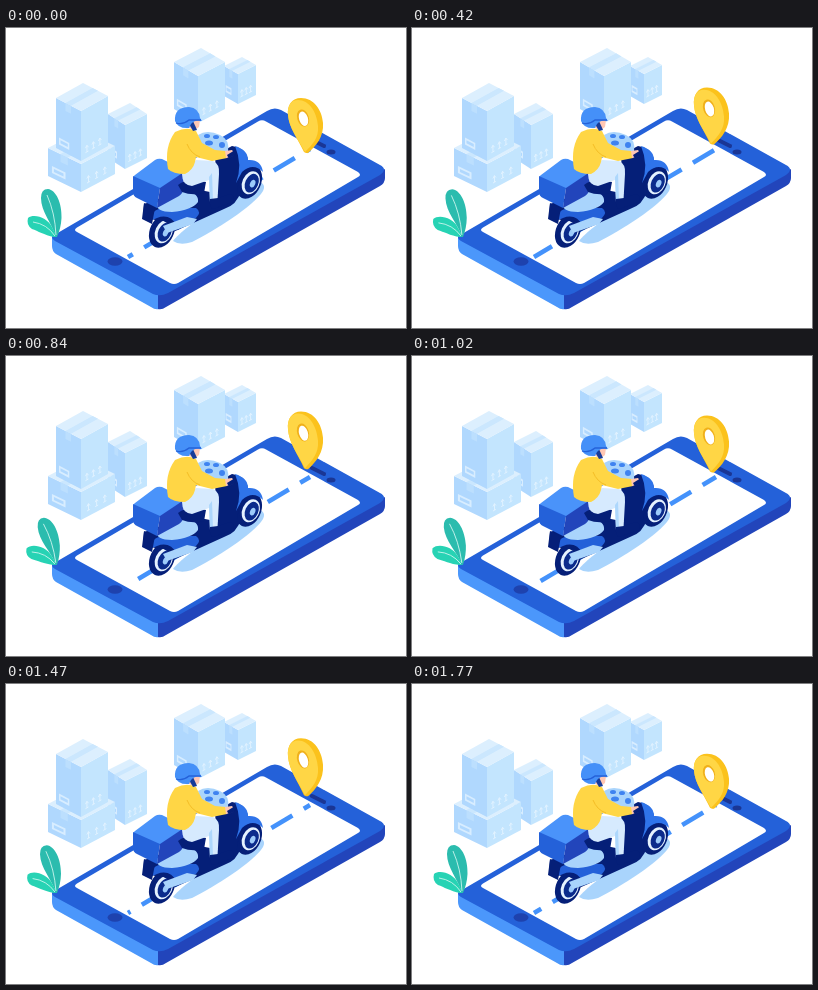
These frames come from a looping animation (400x300 px, 1800 ms). An HTML page:

```html
<!DOCTYPE html>
<html lang="en">
<head>
<meta charset="utf-8">
<title>Scooter delivery</title>
<style>
  html, body { margin: 0; width: 100%; height: 100%; overflow: hidden; background: #fff; }
  svg { display: block; width: 400px; height: 300px; }
</style>
</head>
<body>
<svg viewBox="0 0 400 300">
  <g id="boxes"></g>

  <!-- phone -->
  <path fill="#4b97fb" d="M46 208L153 266V281Q149 282 145 279L50 226Q46 223 46 218Z"/>
  <path fill="#2245bb" d="M152 266L379 141V150Q379 155 374 158L160 279Q156 282 152 281Z"/>
  <path fill="#2461d9" d="M49 206.500L261 83Q268 78.500 275 82L374 137Q382 141 374 147L162 265Q154 269 147 266L49 213Q43 209 49 206.500Z"/>
  <path fill="#fff" d="M71 199.500L252 93.500Q256 91 260 93.500L352 144Q356 147 352 149L172 255Q168 257 164 255L71 204Q67 202 71 199.500Z"/>
  <ellipse cx="109" cy="233.500" rx="7.500" ry="4.200" fill="#1e42ae"/>
  <path d="M306 112L318 118" stroke="#1a3695" stroke-width="4" stroke-linecap="round"/>
  <ellipse cx="325" cy="124" rx="4.500" ry="2.500" fill="#1a3695"/>
  <path id="road" d="M122 229L304 121" pathLength="182" stroke="#4492fb" stroke-width="4.600" stroke-dasharray="21 11.400"/>

  <!-- plant -->
  <g id="plant">
    <path fill="#2bbcae" d="M50 209C46 195 35 184 35 170Q35 161 42 161C50 162 56 175 55.500 190Q55 200 51 209Z"/>
    <path fill="#27d3b4" d="M48 209C38 207 32 203 26 201Q20 197 22 190C28 185 42 190 46 199Q49 204 50 209Z"/>
    <path fill="none" stroke="#c9f4ed" stroke-width=".9" d="M41 167Q49 185 50 207M27 194Q41 196 49 208"/>
  </g>

  <!-- scooter -->
  <path fill="#a9d4fc" d="M167 213C178 198 236 161 250 153Q261 155 257 163C248 178 208 203 186 214Q174 218 167 213Z"/>
  <g id="wheels"></g>
  <path fill="#051f78" d="M138 176L184 160L214 166L231 154L235 163Q231 177 218 181L185 196L167 204Q161 190 149 192L137 188Z"/>
  <path fill="#2461d9" d="M144 193Q145 181 158 180L190 180Q196 184 190 190L171 198Q164 185 151 190Z"/>
  <path fill="#a9d4fc" d="M150 175Q168 162 181 164Q193 165 192 174Q186 182 166 184Q150 184 150 175Z"/>
  <path fill="#a9d4fc" d="M157 198L181 189L191 191L187 196L161 205Z"/>
  <path fill="#051f78" d="M138 175L149 180L146 196L136 191Z"/>
  <path fill="#4a93fa" d="M129 147L149 132Q152 130 156 131L176 141Q180 144 176 147L157 160Q154 162 150 160L130 151Q126 149 129 147Z"/>
  <path fill="#2461d9" d="M127 148L154 160L151 180L131 170Q127 168 127 164Z"/>
  <path fill="#2245bb" d="M154 160L178 144L177 162Q177 165 173 168L151 180Z"/>
  <path fill="#051f78" d="M172 157Q180 150 200 154L198 165Q186 168 176 164Z"/>

  <!-- front shield -->
  <path fill="#051f78" d="M209 127L226 118Q240 120 242 132L235 149Q231 157 231 165L222 174L211 165Z"/>
  <path fill="#2f74ea" d="M229 118Q242 122 242 132Q255 131 257 144Q247 134 236 144L230 155Q237 137 229 118Z"/>
  <path fill="#a9d4fc" d="M192 107Q201 101 214 107Q224 112 222 123L208 125L195 117Z"/>
  <g fill="#3f83f0">
    <ellipse cx="201" cy="108" rx="3" ry="2"/>
    <ellipse cx="210" cy="109" rx="3" ry="2"/>
    <ellipse cx="203" cy="115" rx="4" ry="2.500"/>
    <ellipse cx="216" cy="117" rx="3" ry="3"/>
  </g>

  <!-- rider -->
  <path fill="#d6eafe" d="M176 146L190 132L207 133Q214 136 213 146L211.500 172L204 174L203 152L186 158Q176 157 176 146Z"/>
  <path fill="#add7fc" d="M203 149L206 145L207 173L204 174Z"/>
  <path fill="#051f78" d="M204 171L212 170L224 166Q230 168 227 174L207 181Q203 179 204 171Z"/>
  <path fill="#ffd645" d="M169 104Q181 98 190 103L196 115L209 122L220 123L221 130L206 133L190 129L189 134Q187 142 179 146Q167 146 162 141Q158 119 169 104Z"/>
  <path fill="none" stroke="#f4bd25" d="M181 116Q185 126 194 129"/>
  <path fill="#ffc7b4" d="M219 123L226 122Q230 126 225 129L220 130Z"/>
  <path fill="#051f78" d="M221 127L229 122L231 125L223 131Z"/>
  <path fill="#ffc7b4" d="M183 92L194 92L193 99Q189 103 183 100Z"/>
  <path fill="#173b99" d="M183 96L187 93L191 102L187 103Z"/>
  <path fill="#4590f8" d="M169 93Q168 79 183 79Q193 80 194 90L196 93Q189 91 185 96L183 100Q172 101 169 93Z"/>
  <path fill="none" stroke="#2461d9" stroke-width="1.300" d="M170 95Q177 97 183 92L195 92"/>

  <!-- map pin, tip at the local zero point -->
  <g id="pin">
    <path fill="#fbc21c" d="M0 0H2C10-7 18-16 17-30C16-43 8-55-5-55C-14-55-19-48-18-38C-17-25-8-14-2-1Z"/>
    <path fill="#ffd645" d="M-1-1C6-8 13-15 12-27C11-41 3-53-8-53C-15-53-19-47-18-38C-17-25-8-14-1-1Z"/>
    <ellipse cx="-3" cy="-35" rx="5.800" ry="8.800" fill="#f0b01a" transform="rotate(-18 -3 -35)"/>
    <ellipse cx="-2.500" cy="-34.300" rx="4.400" ry="7.400" fill="#fff" transform="rotate(-18 -2.500 -34.300)"/>
  </g>
</svg>
<script>
const $ = id => document.getElementById(id);
const poly = (fill, ...pts) => `<path fill="${fill}" d="M${pts.join('L')}Z"/>`;

// Carton seen from its front top corner: left and right edge vectors, then height.
function carton(x, y, lx, ly, rx, ry, h) {
  const at = (l, r, d = 0) => [x - lx * l + rx * r, y - ly * l - ry * r + d];
  const face = (fill, ...pts) => poly(fill, ...pts.map(p => at(...p)));
  const arrow = r => {
    const [ax, ay] = at(0, r, h - 6);
    return `<path d="M${ax} ${ay}v-6m-1.500 2.500l1.500-3l1.500 2m-3 5.500l3-1.700" fill="none" stroke="#e4f3ff" stroke-width=".9"/>`;
  };
  return face('#b0d8fe', [0, 0], [1, 0], [1, 0, h], [0, 0, h])
    + face('#c3e5fe', [0, 0], [0, 1], [0, 1, h], [0, 0, h])
    + face('#dceffe', [0, 0], [1, 0], [1, 1], [0, 1])
    + face('#cbe7fe', [.4, 0], [.62, 0], [.62, 1], [.4, 1])
    + face('#bcdffe', [.4, 0], [.62, 0], [.62, 0, 8], [.4, 0, 8])
    + face('#d8edff', [.47, 0, h - 12], [.88, 0, h - 12], [.88, 0, h - 5], [.47, 0, h - 5])
    + face('#b0d8fe', [.53, 0, h - 10], [.82, 0, h - 10], [.82, 0, h - 7], [.53, 0, h - 7])
    + [.22, .46, .7].map(arrow).join('');
}

$('boxes').innerHTML = [
  [232, 46, 14, 8, 18, 9, 30],
  [192, 48, 24, 14, 27, 14, 47],
  [119, 97, 17, 11, 22, 11, 44],
  [75, 136, 33, 16, 34, 18, 28],
  [75, 83, 25, 13, 27, 15, 50]
].map(b => carton(...b)).join('');

const ring = (x, rx, ry, fill) => `<ellipse cx="${x}" rx="${rx}" ry="${ry}" fill="${fill}"/>`;
const wheel = (x, y) => `<g transform="translate(${x} ${y}) rotate(24)">`
  + ring(0, 12, 17.5, '#051f78') + ring(2, 8.5, 12, '#e5f2ff')
  + ring(3, 6.5, 9.8, '#0b2b8c') + ring(4, 2.5, 4, '#9dcbfb') + '</g>';
$('wheels').innerHTML = wheel(156, 203) + wheel(243, 154);

const LOOP = 1800, SPEED = .2; // dash speed in px per ms
const swing = turns => (1 - Math.cos(turns * 2 * Math.PI)) / 2;

function draw(now) {
  const ms = now % LOOP, t = ms / LOOP;
  const lift = swing(t * 3);
  $('pin').setAttribute('transform', `translate(300 ${125 - 13 * lift}) scale(1 ${1 + .055 * lift})`);
  $('road').setAttribute('stroke-dashoffset', ms * SPEED - 16.4);
  $('plant').setAttribute('transform', `rotate(${-5 * swing(t)} 49 209)`);
  requestAnimationFrame(draw);
}
draw(performance.now());
</script>
</body>
</html>
```
